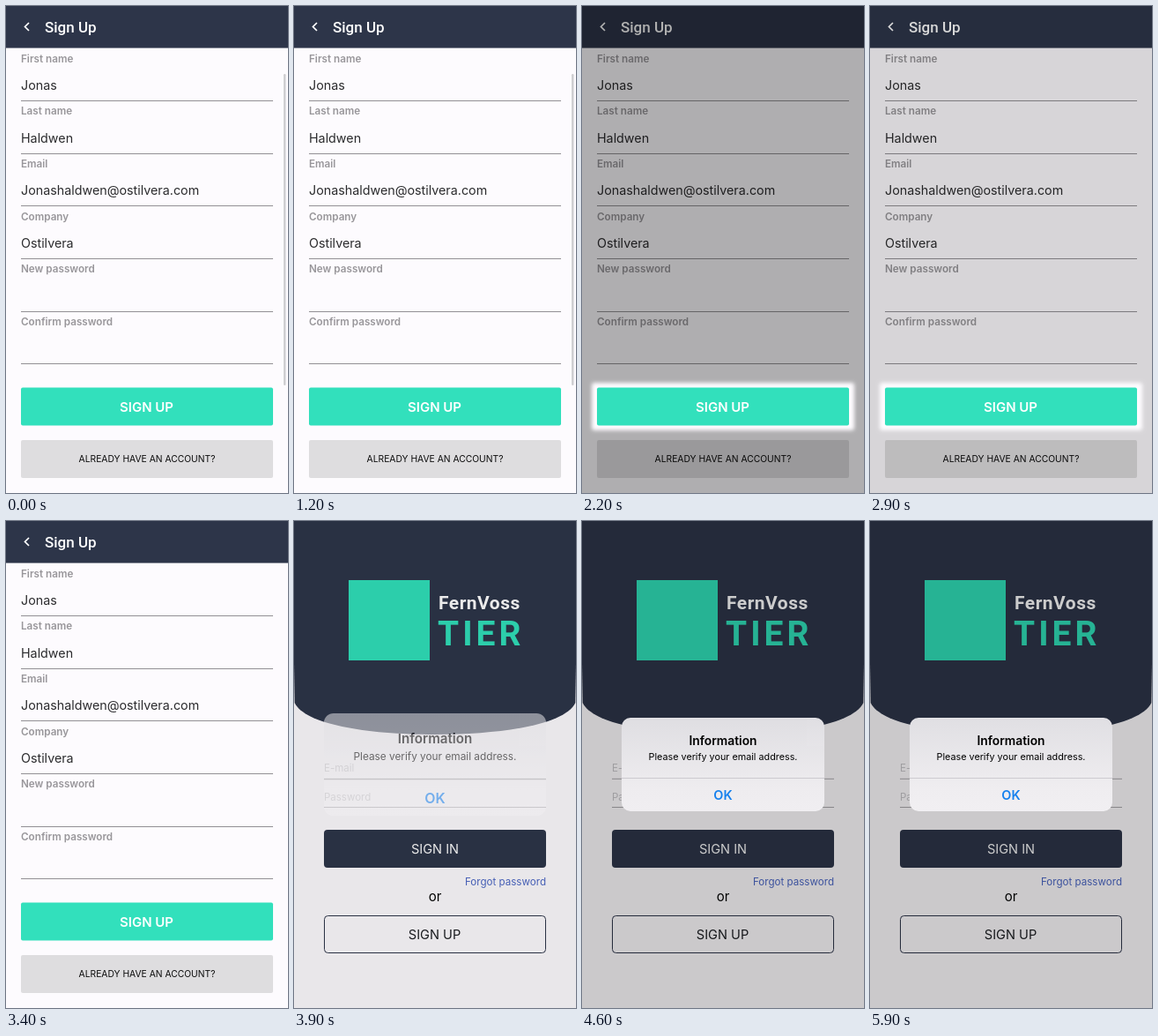
An HTML page that plays this animation: 320 by 552 pixels, repeating every 6000 ms.

```html
<!DOCTYPE html>
<html lang="en">
<head>
<meta charset="utf-8">
<title>Sign up flow</title>
<style>
  html, body { margin: 0; width: 100%; height: 100%; overflow: hidden; background: #fdfbfe; }
  svg { display: block; width: 320px; height: 552px; }
  text { font-family: Inter, "Liberation Sans", sans-serif; white-space: pre; }
  .brand { font-family: Roboto, "Liberation Sans", sans-serif; }
  .mid { text-anchor: middle; }
  .end { text-anchor: end; }
  .navy { fill: #2d3549; }
  .label { font-size: 11.7px; font-weight: 600; fill: #98969a; }
  .value { font-size: 14.3px; fill: #2b2b2d; }
  .hint { font-size: 11.5px; fill: #c6c4c8; }
  .caps { font-size: 14.6px; }
</style>
</head>
<body>
<svg viewBox="0 0 320 552">
  <defs>
    <filter id="soft" x="-10%" y="-40%" width="120%" height="180%">
      <feGaussianBlur stdDeviation="2.2"/>
    </filter>
    <mask id="spotlight" maskUnits="userSpaceOnUse" x="0" y="0" width="320" height="552">
      <rect width="320" height="552" fill="#fff"/>
      <rect x="11" y="427" width="298" height="54" rx="3" fill="#000" filter="url(#soft)"/>
    </mask>
    <linearGradient id="frost" x1="0" y1="0" x2="0" y2="1">
      <stop offset="0" stop-color="#e0dfe3"/>
      <stop offset=".75" stop-color="#efedf0"/>
      <stop offset="1" stop-color="#f1eff2"/>
    </linearGradient>
  </defs>
  <rect width="320" height="552" fill="#fdfbfe"/>

  <g id="signUp">
    <rect class="navy" width="320" height="47.6"/>
    <path d="M26 19L21.5 23.5L26 28" fill="none" stroke="#fff" stroke-width="1.7"/>
    <text class="brand" x="44" y="30" font-size="17" font-weight="500" fill="#fff">Sign Up</text>
    <g id="fields"></g>
    <rect id="scrollbar" x="315" y="77" width="2.5" height="353" rx="1.2" fill="#cfced1"/>
    <rect x="17" y="432.5" width="286" height="43" rx="2" fill="#32e0bc"/>
    <text class="mid" x="159.5" y="459.5" font-size="15" font-weight="600" fill="#fff">SIGN UP</text>
    <rect x="17" y="492" width="286" height="43" rx="2" fill="#dedddf"/>
    <text class="mid" x="160" y="517.3" font-size="10.3" fill="#0c0c0c">ALREADY HAVE AN ACCOUNT?</text>
    <rect id="shade" width="320" height="552" mask="url(#spotlight)"/>
  </g>

  <g id="signIn">
    <path class="navy" d="M0 0H320V162L319.3 206C308 230 240 242 160 242S12 230 .7 206L0 162Z"/>
    <rect x="62" y="67" width="92" height="91" fill="#30dfb9"/>
    <text class="brand" x="164" y="100" font-size="21" font-weight="700" letter-spacing=".5" fill="#fff">FernVoss</text>
    <text class="brand" x="163" y="141" font-size="39" font-weight="700" letter-spacing="4" fill="#30dfb9">TIER</text>
    <text class="hint" x="34" y="284">E-mail</text>
    <text class="hint" x="34" y="317">Password</text>
    <path d="M34 292.3H286M34 324.5H286" stroke="#a9a7ab"/>
    <rect class="navy" x="34" y="350" width="252" height="43" rx="4"/>
    <text class="caps mid" x="160" y="377" fill="#fff">SIGN IN</text>
    <text class="end" x="286" y="413" font-size="11.6" fill="#4b66c4">Forgot password</text>
    <text class="mid" x="160" y="431" font-size="15">or</text>
    <rect x="34.5" y="447.5" width="251" height="42" rx="4" fill="none" stroke="#2d3549"/>
    <text class="caps mid" x="159.5" y="474" fill="#1c1e22">SIGN UP</text>
    <rect id="backdrop" width="320" height="552"/>
    <g id="alert">
      <rect x="45" y="223" width="230" height="106" rx="10" fill="url(#frost)"/>
      <text class="mid" x="160" y="254" font-size="13.8" font-weight="600">Information</text>
      <text class="mid" x="160" y="271" font-size="10.8">Please verify your email address.</text>
      <path d="M45 291.5H275" stroke="#cdcbd0"/>
      <text class="mid" x="160" y="316" font-size="14.5" font-weight="600" fill="#1580ee">OK</text>
    </g>
  </g>
</svg>
<script>
const LOOP = 6000, STEP = 100, ALERT_START = 3900;
const el = id => document.getElementById(id);
const [signUp, signIn, shade, scrollbar, backdrop, alertBox] =
  ["signUp", "signIn", "shade", "scrollbar", "backdrop", "alert"].map(el);

const fields = [
  ["First name", "Jonas"],
  ["Last name", "Haldwen"],
  ["Email", "Jonashaldwen@ostilvera.com"],
  ["Company", "Ostilvera"],
  ["New password", ""],
  ["Confirm password", ""],
];
el("fields").innerHTML = fields.map(([label, value], i) => `
  <g transform="translate(17 ${(i * 59.7).toFixed(1)})">
    <text class="label" y="63.5">${label}</text>
    <text class="value" y="95">${value}</text>
  </g>
  <path d="M17 ${Math.round(i * 59.7 + 106.8) + .5}h286" stroke="#929094"/>`).join("");

const ramp = (t, start, end) => Math.min(1, Math.max(0, (t - start) / (end - start)));
const show = (node, visible) => node.setAttribute("display", visible ? "inline" : "none");

function render(t) {
  const atLogin = t >= ALERT_START;
  show(signUp, !atLogin);
  show(signIn, atLogin);

  if (!atLogin) {
    shade.setAttribute("opacity", .3 * (ramp(t, 1340, 1940) - ramp(t, 2600, 3180)));
    scrollbar.setAttribute("opacity", 1 - ramp(t, 1340, 1640));
    return;
  }
  // The alert settles exponentially to its resting size.
  const rest = Math.exp((ALERT_START - t) / 130);
  backdrop.setAttribute("opacity", .2 * (1 - .6 * rest));
  alertBox.setAttribute("opacity", 1 - .45 * rest);
  alertBox.setAttribute("transform",
    `translate(160 276) scale(${1 + .096 * rest}) translate(-160 -276)`);
}

const origin = performance.now();
function tick() {
  const t = (performance.now() - origin) % LOOP;
  render(Math.floor(t / STEP) * STEP);
  requestAnimationFrame(tick);
}
tick();
</script>
</body>
</html>
```
